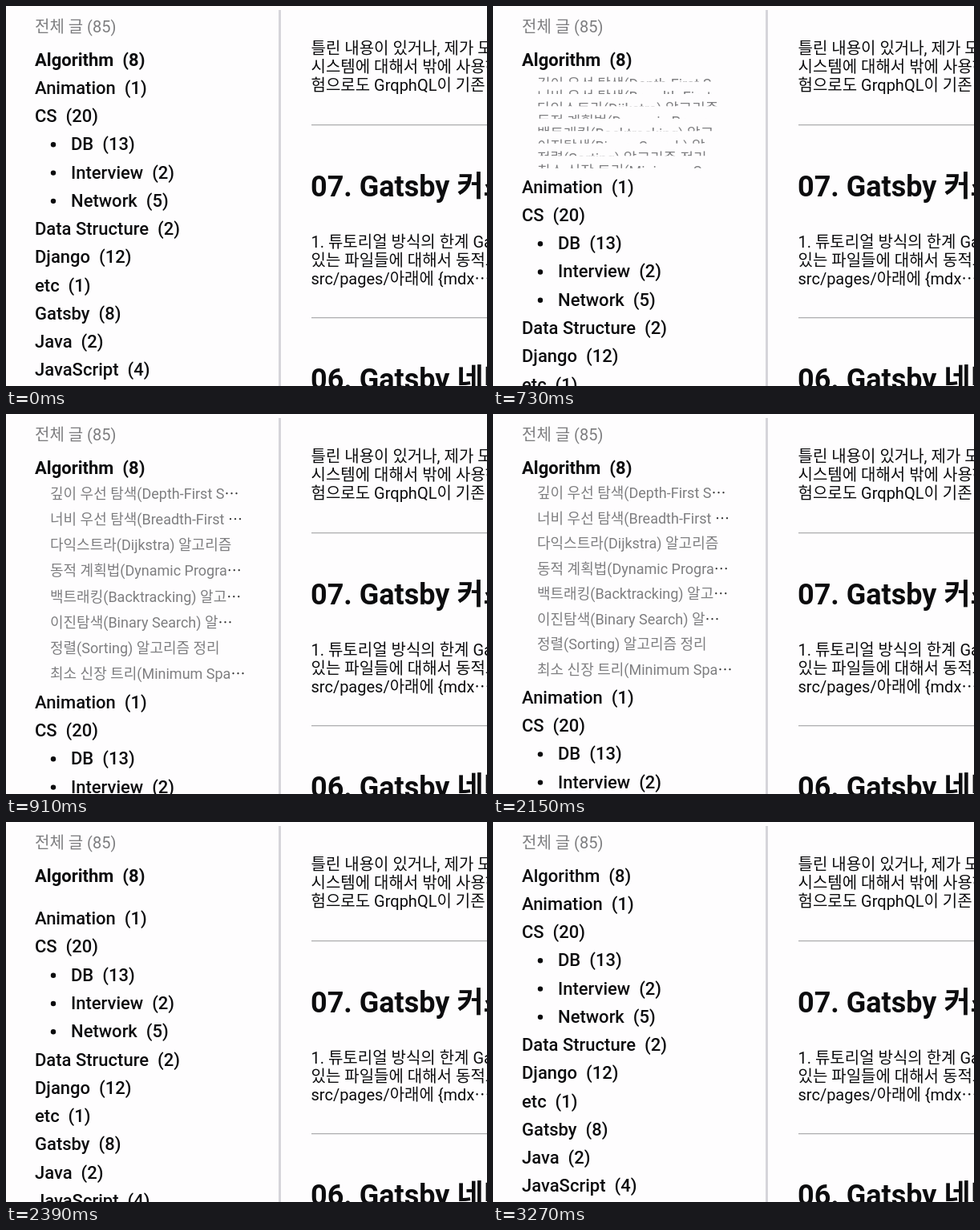
An HTML page with a canvas that plays this animation: 600x475 px, repeating every 3.3 s.

```html
<!DOCTYPE html>
<html lang="ko">
<head>
<meta charset="utf-8">
<style>
  html, body { margin: 0; width: 100%; height: 100%; overflow: hidden; background: #fefdfe; }
  canvas { display: block; }
</style>
</head>
<body>
<canvas id="stage" width="600" height="475"></canvas>
<script>
const ctx = document.getElementById('stage').getContext('2d');
const LOOP = 3300;
const FAMILY = 'Roboto, "Noto Sans CJK KR", "Noto Sans CJK", sans-serif';
const INK = '#0c0c0e', GRAY = '#7e7e80';
const ROW = 35.27, LIST_TOP = 84.4, MARGIN = 12.25, LINE = 20, GAP = 5.5;

const categories = [
  ['Animation', 1], ['CS', 20], ['DB', 13, true], ['Interview', 2, true], ['Network', 5, true],
  ['Data Structure', 2], ['Django', 12], ['etc', 1], ['Gatsby', 8], ['Java', 2], ['JavaScript', 4],
];
// A trailing "~" marks a shortened title.
const posts = [
  '깊이 우선 탐색(Depth-First S~', '너비 우선 탐색(Breadth-First ~',
  '다익스트라(Dijkstra) 알고리즘', '동적 계획법(Dynamic Progra~',
  '백트래킹(Backtracking) 알고~', '이진탐색(Binary Search) 알~',
  '정렬(Sorting) 알고리즘 정리', '최소 신장 트리(Minimum Spa~',
];
const excerpts = [
  [60, ['틀린 내용이 있거나, 제가 모르는', '시스템에 대해서 밖에 사용하지', '험으로도 GrqphQL이 기존 방식']],
  [302, ['1. 튜토리얼 방식의 한계 Gatsby', '있는 파일들에 대해서 동적으로', 'src/pages/아래에 {mdx⋯']],
];

const clamp = x => Math.min(1, Math.max(0, x));

function bezier(x1, y1, x2, y2) {
  const curve = (a, b, s) => 3 * a * s * (1 - s) ** 2 + 3 * b * s * s * (1 - s) + s ** 3;
  return x => {
    let low = 0, high = 1;
    for (let i = 0; i < 24; i++) {
      const mid = (low + high) / 2;
      if (curve(x1, x2, mid) < x) low = mid; else high = mid;
    }
    return curve(y1, y2, low);
  };
}
const ease = bezier(.25, .1, .25, 1);
const easeInOut = bezier(.42, 0, .58, 1);

function write(text, x, y, size, weight = 400, color = INK) {
  ctx.font = `${weight} ${size}px ${FAMILY}`;
  ctx.fillStyle = color;
  ctx.fillText(text, x, y);
  return x + ctx.measureText(text).width;
}

// Height of one post row and the vertical shift of its text.
function listState(t) {
  if (t < 580 || t >= 2670) return { height: 0, shift: 0 };
  if (t < 2150) {
    const open = easeInOut(clamp((t - 560) / 350));
    return { height: (MARGIN + LINE) * open, shift: -3 * (1 - open) };
  }
  const closed = ease(clamp((t - 2136) / 500));
  return {
    height: MARGIN * (1 - closed) + LINE * Math.max(0, 1 - 1.65 * closed),
    shift: -6.5 * clamp(closed / .314),
  };
}

function drawPosts({ height, shift }) {
  if (height <= GAP) return;
  posts.forEach((post, i) => {
    const top = LIST_TOP + i * height;
    ctx.save();
    ctx.beginPath();
    ctx.rect(36, top, 290, height - GAP);
    ctx.clip();
    const y = top + 21.3 + shift;
    const end = write(post.replace('~', ''), 55, y, 18, 400, GRAY);
    if (post.endsWith('~')) write('⋯', end, y, 18, 400, '#333');
    ctx.restore();
  });
}

function drawSidebar(t) {
  const list = listState(t);
  const weight = t >= 3270 ? 500 : t < 60 || t >= 3240 ? 600 : 700;
  write('전체 글 (85)', 36, 33, 20, 400, GRAY);
  write('Algorithm  (8)', 36, 74.5, 22, weight);
  drawPosts(list);
  categories.forEach(([name, count, nested], i) => {
    const y = 74.5 + ROW * (i + 1) + list.height * posts.length;
    write(`${name}  (${count})`, nested ? 81 : 36, y, 22, 500);
    if (nested) {
      ctx.beginPath();
      ctx.arc(59, y - 7, 3.2, 0, 2 * Math.PI);
      ctx.fill();
    }
  });
}

function drawArticles() {
  ctx.fillStyle = '#d6d5da';
  ctx.fillRect(340, 5, 3, 470);
  for (const [y, lines] of excerpts)
    lines.forEach((line, i) => write(line, 380.5, y + 22.9 * i, 20));
  ctx.fillStyle = '#aeaeb0';
  for (const y of [148, 389]) ctx.fillRect(381, y, 219, 1.3);
  write('07. Gatsby 커스텀', 380, 238, 36, 700);
  write('06. Gatsby 네비', 380, 479, 36, 700);
}

function draw(now) {
  ctx.fillStyle = '#fefdfe';
  ctx.fillRect(0, 0, 600, 475);
  drawSidebar(now % LOOP);
  drawArticles();
  requestAnimationFrame(draw);
}
requestAnimationFrame(draw);
</script>
</body>
</html>
```
